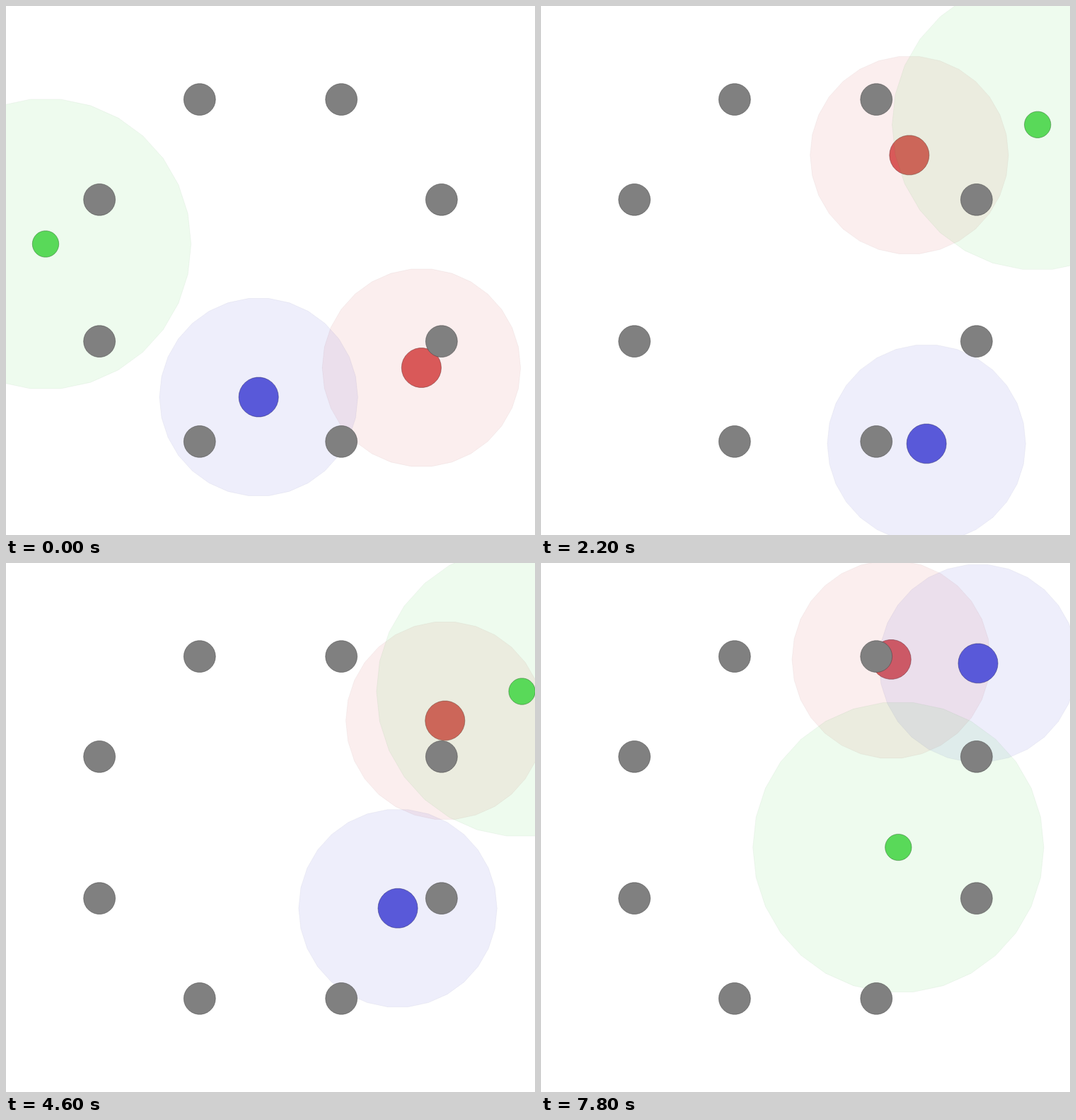
Animation of 748x748 px, one loop 8000 ms. Source, as an HTML page with a canvas:

```html
<!DOCTYPE html>
<html>
<head>
<meta charset="utf-8">
<style>
html, body { margin: 0; width: 100%; height: 100%; overflow: hidden; background: #fff; }
canvas { display: block; width: 748px; height: 748px; }
</style>
</head>
<body>
<canvas id="stage" width="748" height="748"></canvas>
<script>
const ctx = document.getElementById('stage').getContext('2d');
const SIZE = 748, UNIT = SIZE / 2;
const STEP = 200, STEPS = 40;
const GREY = [128, 128, 128];

const agents = [
  { name: 'red', rgb: [217, 89, 89], size: 0.075, range: 0.375 },
  { name: 'blue', rgb: [89, 89, 217], size: 0.075, range: 0.375 },
  { name: 'green', rgb: [89, 217, 89], size: 0.05, range: 0.55 }
];

// Position under steady acceleration
const glide = (p, v, a = 0) => n => p + v * n + a * n * n;

// Smooth curve through points spaced `gap` steps apart, starting from rest
function tour(gap, ...points) {
  const last = points.length - 1;
  const rate = i => i === 0 ? 0
    : i === last ? 2 * (points[i] - points[i - 1]) - rate(i - 1)
    : (points[i + 1] - points[i - 1]) / 2;
  return n => {
    const i = Math.min(Math.floor(n / gap), last - 1);
    const u = n / gap - i, v = 1 - u;
    return v * v * (1 + 2 * u) * points[i] + u * u * (3 - 2 * u) * points[i + 1] +
      u * v * (v * rate(i) - u * rate(i + 1));
  };
}

// Each episode begins with a hard reset; paths are [x, y] functions of its steps.
const episodes = [
  {
    start: 0,
    red: [glide(587.4, 3.72, -0.248), glide(511.5, 7.34)],
    blue: [glide(357.2, 17.79), glide(553, 2.45)],
    green: [glide(56, 24.05), glide(336.5, 5.925)]
  },
  {
    start: 11,
    red: [tour(8, 520.8, 604.8, 632.9, 686), tour(8, 210.9, 214.6, 234.3, 262.2)],
    blue: [tour(8, 545.1, 549.5, 570.4, 669), tour(8, 618.9, 540.8, 434.8, 350.2)],
    green: [tour(8, 702.2, 701.5, 771, 877), tour(8, 167.8, 166.9, 201, 238.5)]
  },
  {
    start: 37,
    red: [glide(495.2, 0), glide(130, 2, 0.6)],
    blue: [glide(620.5, -0.75, -0.25), glide(135.5, 2, 0.6)],
    green: [glide(505.3, 0), glide(397, 1.5, 0.5)]
  }
];

// Discs are 30-sided polygons with a darker, half-transparent edge.
function disc(x, y, radius, rgb, alpha) {
  const r = radius * UNIT;
  ctx.beginPath();
  for (let i = 0; i < 30; i++) {
    const a = i * Math.PI / 15;
    ctx.lineTo(x + r * Math.cos(a), y + r * Math.sin(a));
  }
  ctx.closePath();
  ctx.fillStyle = `rgba(${rgb}, ${alpha})`;
  ctx.fill();
  ctx.strokeStyle = `rgba(${rgb.map(c => c / 2)}, ${alpha / 2})`;
  ctx.stroke();
}

function draw(step) {
  ctx.fillStyle = '#fff';
  ctx.fillRect(0, 0, SIZE, SIZE);
  const episode = episodes.filter(e => e.start <= step).pop();
  for (const { name, rgb, size, range } of agents) {
    const [x, y] = episode[name].map(path => path(step - episode.start));
    disc(x, y, range, rgb, 0.1);
    disc(x, y, size, rgb, 1);
  }
  for (let i = 0; i < 8; i++) {
    const a = (i + 0.5) * Math.PI / 4;
    disc(UNIT + 0.7 * UNIT * Math.cos(a), UNIT + 0.7 * UNIT * Math.sin(a), 0.06, GREY, 1);
  }
}

const begin = performance.now();
function tick() {
  const t = Math.max(0, performance.now() - begin);
  draw(Math.floor(t / STEP) % STEPS);
  requestAnimationFrame(tick);
}
tick();
</script>
</body>
</html>
```
